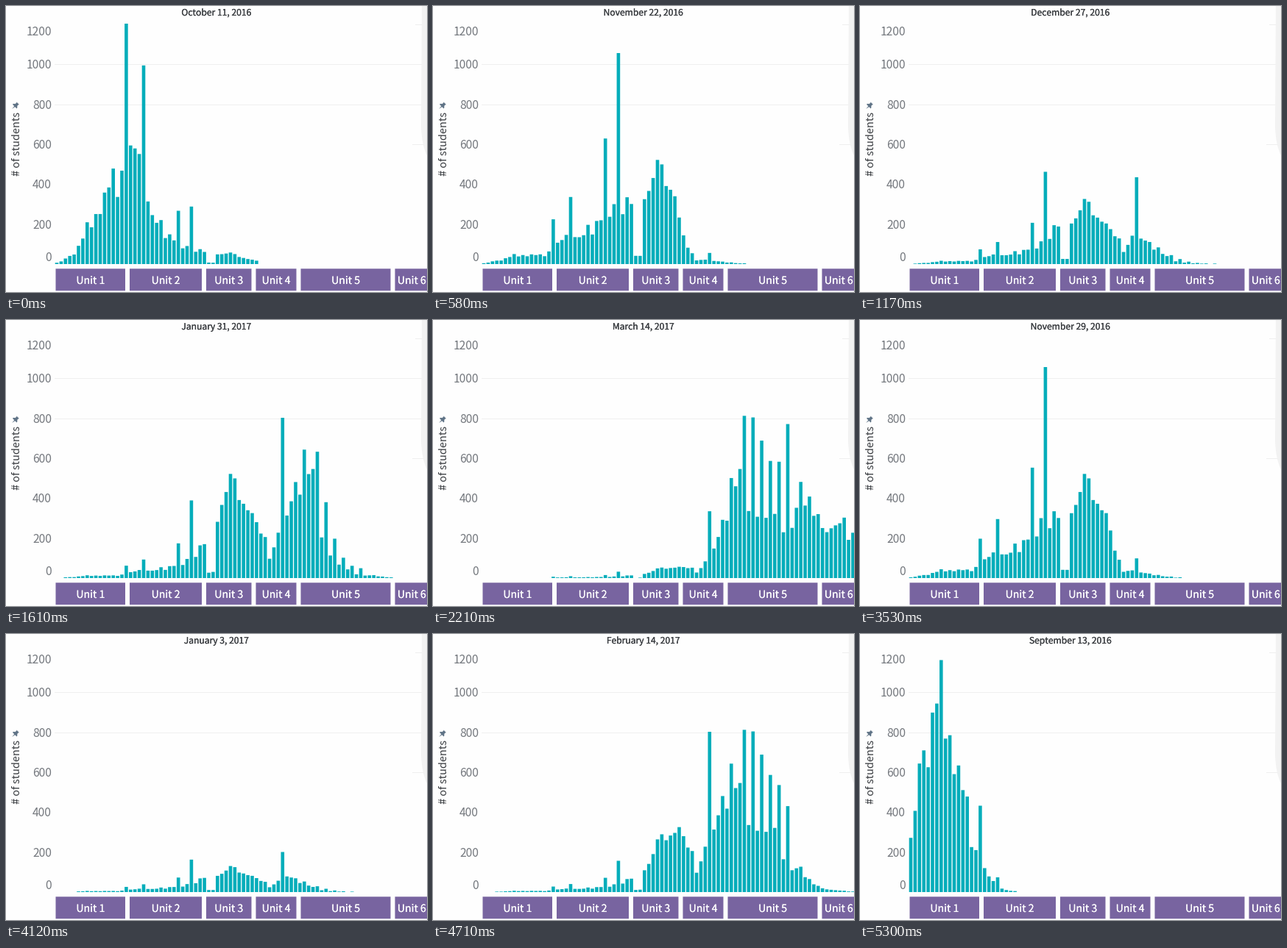
Animation of 572x389 px, one loop 5.4 s. Source, as a matplotlib script:

```python
import matplotlib.dates as mdates
import matplotlib.patheffects as pe
import matplotlib.pyplot as plt
import numpy as np
from matplotlib.animation import FuncAnimation
from matplotlib.collections import PolyCollection
from matplotlib.patches import PathPatch, Polygon, Rectangle
from matplotlib.path import Path

W, H, DPI = 572, 389, 64
PX = 72 / DPI                     # points per pixel
LOOP, TICK, HOLD = 5400, 20, 147.25
FONT = "Noto Sans CJK JP"
TEAL, PURPLE, INK, GREY = "#05adba", "#7864a0", "#3a3d41", "#74787e"
BASE, TOP = 351, 327              # bar baseline and tallest bar
FIRST, PITCH, BAR_W = 69, 5.9, 4.6

fig = plt.figure(figsize=(W / DPI, H / DPI), dpi=DPI, facecolor="#fefefe")
ax = fig.add_axes([0, 0, 1, 1])
ax.set(xlim=(0, W), ylim=(H, 0))
ax.axis("off")


def label(x, y, text, px, color, ha="center", bold=0.0, **kw):
    t = ax.text(x, y, text, fontsize=px * PX, color=color, family=FONT,
                ha=ha, va="baseline", **kw)
    if bold:
        t.set_path_effects([pe.withStroke(linewidth=bold * PX, foreground=color)])
    return t


items = np.arange(86)
left = FIRST + PITCH * items - BAR_W / 2


def item_sizes():
    """Peak bar height per item: a smooth level, some jitter, a few favourites."""
    level = np.interp(
        items,
        [0, 7, 10, 15, 19, 22, 34, 35, 36, 37, 40, 45, 49, 57, 70, 85],
        [80, 310, 156, 100, 185, 95, 80, 10, 10, 100, 130, 95, 28, 150, 120, 55])
    zigzag = np.where((items > 59) & (items < 72), 0.4 * (-1.0) ** items, 0)
    size = level * (1 + zigzag) * np.random.default_rng(4).normal(1, 0.12, 86)
    for item, height in ((16, 390), (20, 330), (28, 197), (31, 287), (52, 218)):
        size[item] = height
    return size


sizes = item_sizes()


def heights(week):
    """The class is spread over items lo to hi, with a tail on either side."""
    def track(*values):
        return np.interp(week, [-4, 0, 2, 6, 16, 22], values)

    lo, lag = track(0, 13, 18, 29, 38, 59), track(3, 3.5, 4.5, 7, 7, 8)
    hi, lead = track(13, 18, 28, 44, 59, 85), track(2.5, 10, 4, 3, 4, 4)
    share = np.exp(-np.maximum(lo - items, 0) / lag
                   - np.maximum(items - hi, 0) / lead)
    released = items < 47 + 2.2 * week
    winter_break = 0.75 * max(0, 1 - abs(week - 12) / 2)
    h = np.minimum(sizes * share * released * (1 - winter_break), TOP)
    return np.where(h < 0.6, 0, h)


def week_at(step):
    """Weeks after October 11; ten pass each second, then the course restarts."""
    pos = step * HOLD / 100 + 0.2
    return max(-5, int(np.floor((pos + 5.3) % 28.5 - 5.3)))


# Grid and the panel edge on the right
for y, x0, x1 in ((24.5, 556, 567), (78.5, 66, 567), (133.5, 66, 567),
                  (187.5, 552, W)):
    ax.plot([x0, x1], [y, y], color="#efefef", lw=PX, zorder=1)
edge = Path([(W, 0), (565, 0), (564, 165), (565, 190), (W, 203), (W, 0)],
            [Path.MOVETO, Path.LINETO, Path.LINETO, Path.CURVE3, Path.CURVE3,
             Path.CLOSEPOLY])
ax.add_patch(PathPatch(edge, fc="#f2f2f2", ec="none", zorder=2))

# Value axis
for value, y in zip(range(0, 1201, 200),
                    (341.5, 297.5, 242.5, 188, 134, 79, 34.5)):
    label(62, y + 5.5, str(value), 15.6, GREY, ha="right")
label(19.2, 187.5, "# of students", 14.5, INK,
      rotation=90, rotation_mode="anchor")
pin = [(8.2, 140), (11.2, 136.2), (8.8, 133.6), (10.6, 132.9), (12.4, 133.2),
       (14.4, 131.6), (14.2, 130.4), (18, 134.2), (16.8, 134.2),
       (15.2, 136), (15.4, 137.8), (14.6, 139.5), (12.2, 137.2)]
ax.add_patch(Polygon(pin, fc="#5f7386", ec="none"))

# Units
for n, (x0, x1) in enumerate(((67.5, 162), (168, 266), (272, 333.5),
                              (339.5, 394.5), (400.5, 522.5), (528.5, 574)), 1):
    ax.add_patch(Rectangle((x0, 357.3), x1 - x0, 30, fc=PURPLE, ec="none",
                           snap=False))
    label((x0 + x1) / 2, 378, f"Unit {n}", 14.1, "white", bold=0.1)

bars = PolyCollection([], facecolors=TEAL, edgecolors="none", zorder=3)
bars.set_snap(False)
ax.add_collection(bars, autolim=False)
title = label(286, 13, "", 12.1, INK, bold=0.2)
start = mdates.date2num(np.datetime64("2016-10-11"))


def update(i):
    week = week_at(int((i + 1) * TICK / HOLD))
    top = BASE - heights(week)
    right, base = left + BAR_W, np.full(len(left), BASE)
    bars.set_verts(np.stack([np.stack([left, left, right, right], 1),
                             np.stack([base, top, top, base], 1)], 2))
    day = mdates.num2date(start + 7 * week)
    title.set_text(f"{day:%B} {day.day}, {day.year}")
    return bars, title


anim = FuncAnimation(fig, update, frames=LOOP // TICK, interval=TICK,
                     repeat=True, repeat_delay=0)
plt.show()
```
